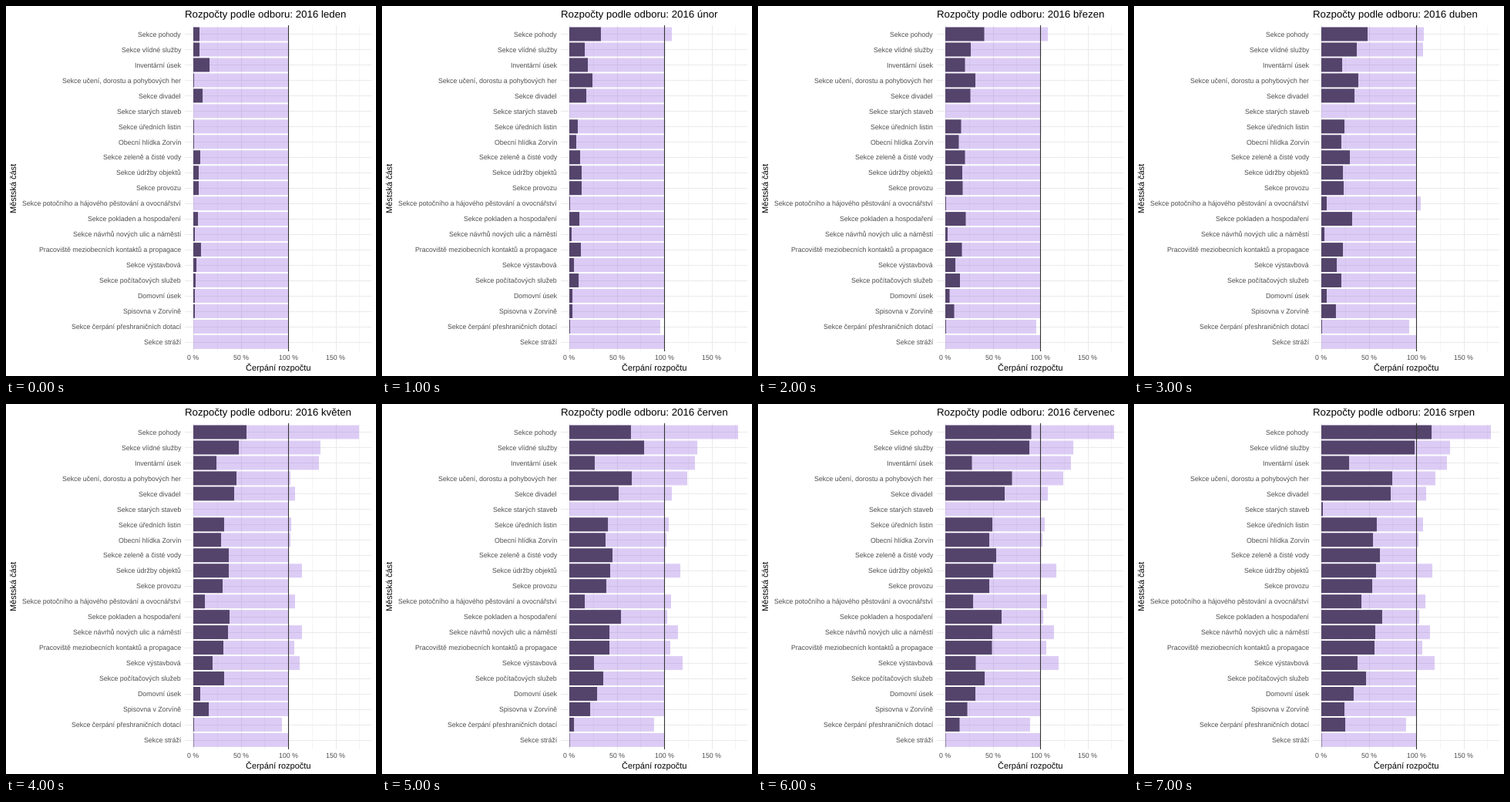
Write a matplotlib script that moves like this. It is 480x480 px and loops after 8000 ms.

```python
import numpy as np
import matplotlib.pyplot as plt
from matplotlib.animation import FuncAnimation

SIZE, DPI = 480, 80
PT = 72 / DPI  # points per pixel
LEFT, RIGHT, ZERO, SCALE = 232, 474, 243, 1.23
FIRST_ROW, STEP = 36.5, 19.97

MONTHS = ["leden", "únor", "březen", "duben",
          "květen", "červen", "červenec", "srpen"]
KNOWN = [0, 1, 3, 4, 5, 7]  # months with listed spending

# label and percent spent in the known months
ROWS = [
    ("Sekce pohody", (6.5, 33.3, 48.8, 56.1, 65, 116.3)),
    ("Sekce vlídné služby", (6.5, 16.3, 37.4, 48, 78.9, 98.4)),
    ("Inventární úsek", (17.1, 19.5, 22, 24.4, 26.8, 29.3)),
    ("Sekce učení, dorostu a pohybových her", (0.8, 24.4, 39, 45.5, 65.9, 74.8)),
    ("Sekce divadel", (9.8, 17.9, 35, 43.1, 52, 73.2)),
    ("Sekce starých staveb", (0, 0, 0, 0, 0, 1.6)),
    ("Sekce úředních listin", (0.8, 8.9, 24.4, 32.5, 40.7, 58.5)),
    ("Obecní hlídka Zorvín", (0.8, 7.3, 21.1, 29.3, 38.2, 54.5)),
    ("Sekce zeleně a čisté vody", (7.3, 11.4, 30.1, 37.4, 45.5, 61.8)),
    ("Sekce údržby objektů", (5.7, 13, 22.8, 37.4, 43.1, 57.7)),
    ("Sekce provozu", (5.7, 13, 23.6, 30.9, 39, 53.7)),
    ("Sekce potočního a hájového pěstování a ovocnářství",
     (0, 0.8, 5.7, 12.2, 16.3, 42.3)),
    ("Sekce pokladen a hospodaření", (4.9, 10.6, 32.5, 38.2, 54.5, 64.2)),
    ("Sekce návrhů nových ulic a náměstí", (1.6, 2.4, 3.3, 36.6, 42.3, 56.9)),
    ("Pracoviště meziobecních kontaktů a propagace",
     (8.1, 12.2, 22.8, 31.7, 42.3, 56.1)),
    ("Sekce výstavbová", (3.3, 4.9, 16.3, 20.3, 26, 38.2)),
    ("Sekce počítačových služeb", (2.4, 9.8, 21.1, 32.5, 35.8, 47.2)),
    ("Domovní úsek", (1.6, 3.3, 5.7, 7.3, 29.3, 34.1)),
    ("Spisovna v Zorvíně", (1.6, 3.3, 15.4, 16.3, 22, 24.4)),
    ("Sekce čerpání přeshraničních dotací", (0, 0.8, 0.8, 0.8, 4.9, 25.2)),
    ("Sekce stráží", (0, 0, 0, 0.4, 0.4, 0.4)),
]

# budget revisions by month: row -> percent of the first plan
REVISIONS = {
    0: {1: 101},
    1: {0: 108.1, 6: 101, 19: 95.9},
    3: {1: 107.3, 11: 104.9, 19: 92.7},
    4: {0: 174.8, 1: 134.1, 2: 132.5, 3: 102.4, 4: 107.3, 6: 103.3, 7: 102.4,
        8: 101, 9: 114.6, 11: 107.3, 13: 114.6, 14: 106.5, 15: 112.2, 19: 93.5},
    5: {0: 178, 1: 135, 3: 124.4, 4: 108.1, 6: 104.9, 9: 117.1, 10: 100.7,
        12: 103.3, 15: 119.5, 16: 100.7, 19: 89.4},
    7: {0: 178.9, 1: 135.8, 3: 120.3, 4: 110.6, 6: 107.3, 10: 101.3,
        11: 109.8, 18: 100.5},
}


def spent(values, month):
    """Percent spent; between known months take the middle, tiny sums wait."""
    before = values[max(i for i, m in enumerate(KNOWN) if m <= month)]
    return before if before < 3 else np.interp(month, KNOWN, values)


def budgets(month):
    level = [100] * len(ROWS)
    for start, changes in REVISIONS.items():
        if start <= month:
            for row, value in changes.items():
                level[row] = value
    return level


plt.rcParams.update({"font.family": "Liberation Sans", "text.hinting": "none"})
fig = plt.figure(figsize=(SIZE / DPI, SIZE / DPI), dpi=DPI, facecolor="white")


def put(x, y, text, size, color="black", **kw):
    return fig.text(x / SIZE, 1 - y / SIZE, text, fontsize=size * PT,
                    color=color, va="baseline", **kw)


n = len(ROWS)
top = FIRST_ROW - 0.6 * STEP
height = (n + 0.2) * STEP
ax = fig.add_axes([LEFT / SIZE, 1 - (top + height) / SIZE,
                   (RIGHT - LEFT) / SIZE, height / SIZE])
ax.set_xlim((LEFT - ZERO) / SCALE, (RIGHT - ZERO) / SCALE)
ax.set_ylim(n - 0.4, -0.6)
ax.axis("off")

# grid
for x in range(0, 176, 25):
    ax.axvline(x, color="#ebebeb", lw=(0.53 if x % 50 else 1.07) * PT, zorder=0)
for y in range(n):
    ax.axhline(y, color="#ebebeb", lw=1.07 * PT, zorder=0)

# bars and the full-budget line
rows = np.arange(n)
light = ax.barh(rows, [0] * n, height=0.9, color=(0.557, 0.345, 0.87),
                alpha=0.3, lw=0, snap=False, zorder=2)
dark = ax.barh(rows, [0] * n, height=0.9, color="#54446b",
               lw=0, snap=False, zorder=3)
ax.axvline(100, color="#333333", lw=1.07 * PT, zorder=4)
ax.set_xlim((LEFT - ZERO) / SCALE, (RIGHT - ZERO) / SCALE)
ax.set_ylim(n - 0.4, -0.6)

# labels
for i, (name, _) in enumerate(ROWS):
    put(227, FIRST_ROW + i * STEP + 3.3, name, 8.8, "#4d4d4d", ha="right")
for x in range(0, 151, 50):
    put(ZERO + x * SCALE, 459.2, f"{x} %", 8.8, "#4d4d4d", ha="center")
put(353, 473, "Čerpání rozpočtu", 11, ha="center")
put(13.5, 236, "Městská část", 11, ha="center", rotation=90,
    rotation_mode="anchor")
title = put(LEFT, 15, "", 13.2, ha="left")


def draw(month):
    title.set_text(f"Rozpočty podle odboru: 2016 {MONTHS[month]}")
    for bar, width in zip(light, budgets(month)):
        bar.set_width(width)
    for bar, (_, values) in zip(dark, ROWS):
        bar.set_width(spent(values, month))
    return [title, *light, *dark]


anim = FuncAnimation(fig, draw, frames=len(MONTHS), interval=1000,
                     init_func=lambda: draw(0), repeat=True, repeat_delay=0)
plt.show()
```
